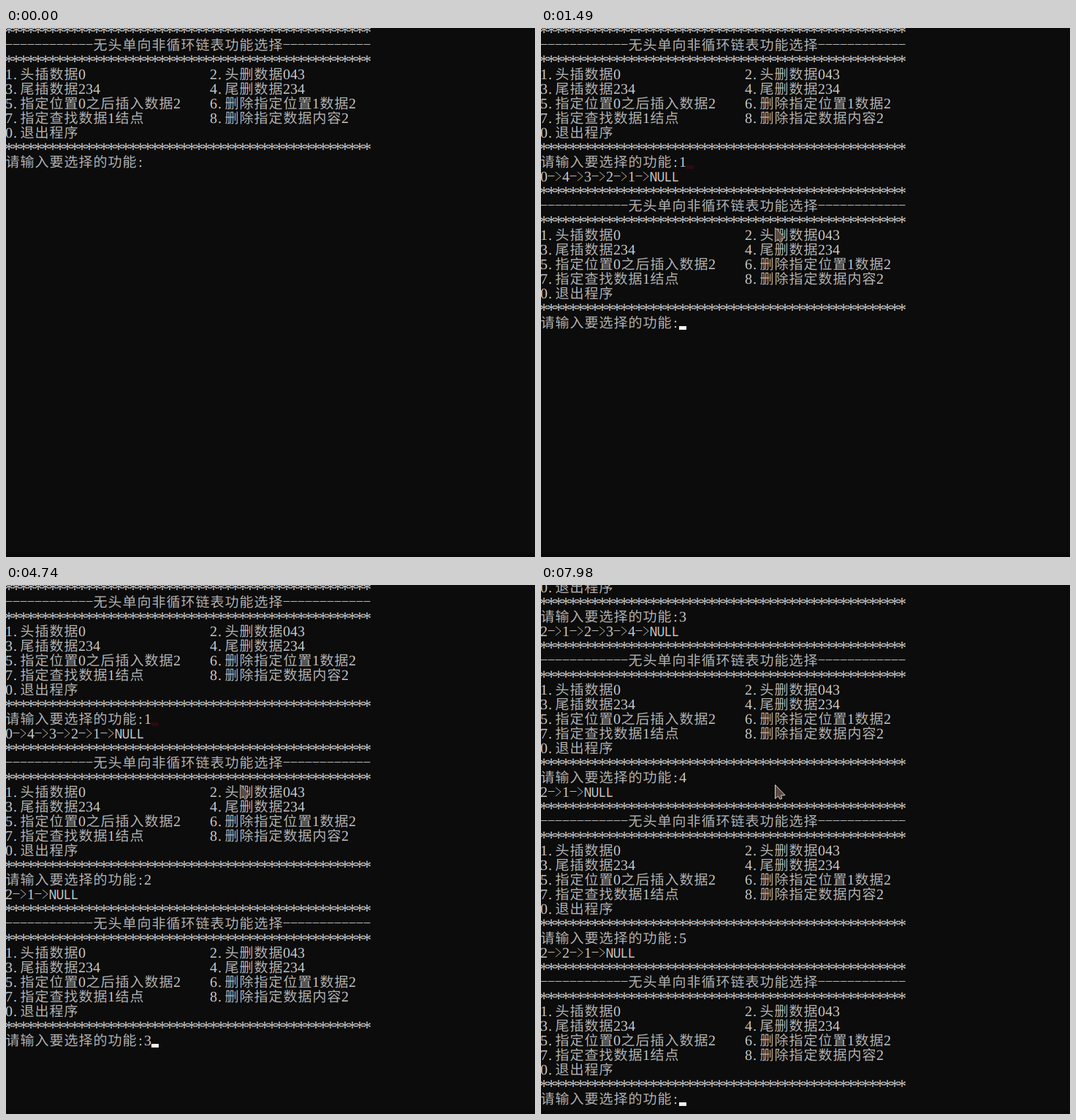
These frames come from a looping animation (724 by 724 pixels, 8000 ms). An HTML page:

```html
<!DOCTYPE html>
<html lang="zh">
<head>
<meta charset="utf-8">
<title>Linked list menu</title>
<style>
  html, body { margin: 0; width: 100%; height: 100%; overflow: hidden; background: #0c0c0c; }
  svg { display: block; width: 100vw; height: 100vh; overflow: hidden; }
  text { fill: currentColor; text-rendering: geometricPrecision; }
  use { mix-blend-mode: screen; }
  .han { font: 300 19px "Noto Sans CJK SC", "Noto Sans CJK", sans-serif; fill-opacity: .88; }
  .num { font: 20px "Liberation Serif", serif; text-anchor: middle; }
  .cap { font: 300 18px "Noto Sans Mono", monospace; text-anchor: middle; }
  .star { font: 25px "Liberation Serif", serif; text-anchor: middle; }
  .dash { fill: none; stroke: currentColor; stroke-width: 1; stroke-opacity: .9; }
</style>
</head>
<body>
<svg id="stage" viewBox="0 0 724 724">
  <defs><g id="term"></g></defs>
  <rect width="724" height="724" fill="#0c0c0c"/>
  <rect y="719" width="724" height="5" fill="#080808"/>
  <!-- one layer per colour channel gives the subpixel fringes of console text -->
  <use href="#term" x=".33" color="#c80000"/>
  <use href="#term" color="#00c800"/>
  <use href="#term" x="-.33" color="#0000c8"/>
  <rect id="stain" x="199" y="188" width="10" height="5" fill="#2c0a10"/>
  <rect id="caret" width="10" height="5" fill="#f2f2f2"/>
  <path id="mouse" d="M.5 .5V19.5L4.6 16L7 20.2L9.8 19.4L8.4 15.2L14 14.6Z" fill="#5a4a44" stroke-linejoin="round"/>
</svg>
<script>
const NS = 'http://www.w3.org/2000/svg';
const LOOP = 8000, CELL = 10, ROW = 20, LEFT = -1, TOP = -7, BLOCK = 11, LAST_ROW = 35;
const STARS = '*'.repeat(50), LINE = '-'.repeat(12);
const MENU = [
  [STARS],
  [LINE + '无头单向非循环链表功能选择' + LINE],
  [STARS],
  ['1.头插数据0', '2.头删数据043'],
  ['3.尾插数据234', '4.尾删数据234'],
  ['5.指定位置0之后插入数据2', '6.删除指定位置1数据2'],
  ['7.指定查找数据1结点', '8.删除指定数据内容2'],
  ['0.退出程序'],
  [STARS],
  ['请输入要选择的功能:']
];
const PROMPT_ROW = 9, PROMPT_COL = 19, SECOND_COL = 28;
const RESULTS = [
  '0->4->3->2->1->NULL', '2->1->NULL', '2->1->2->3->4->NULL',
  '2->1->NULL', '2->2->1->NULL'
];
const TYPED = [1030, 2880, 4140, 6060, 7320];
const ENTERED = [1490, 3350, 4940, 6590, 7980];
const CARET_ON = [
  [1030, 2090], [2620, 3150], [3350, 4210], [4740, 5730],
  [6060, 6260], [6590, 7320], [7850, LOOP]
];

const el = id => document.getElementById(id);

// Skips unchanged values so the layers are not rebuilt every frame.
function set(node, key, value) {
  if (node.getAttribute(key) !== String(value)) node.setAttribute(key, value);
}
const show = (node, on) => set(node, 'visibility', on ? 'visible' : 'hidden');

function add(parent, tag, attrs = {}, text = '') {
  const node = document.createElementNS(NS, tag);
  for (const key in attrs) node.setAttribute(key, attrs[key]);
  node.textContent = text;
  parent.appendChild(node);
  return node;
}

const kindOf = ch =>
  ch === '*' ? 'star' :
  ch > '\u2e80' ? 'han' :
  /[A-Z]/.test(ch) ? 'cap' : 'num';

// Places each character on the console grid, wide ones over two cells.
function write(parent, str, row, col = 0) {
  const top = TOP + row * ROW, runs = {};
  let strokes = '';
  for (const ch of str) {
    const x = LEFT + col * CELL, kind = kindOf(ch);
    col += kind === 'han' ? 2 : 1;
    if (ch === '-') { strokes += `M${x + .5} ${top + 9.5}h9`; continue; }
    if (ch === '>') { strokes += `M${x + 1} ${top + 4}l7 6l-7 6`; continue; }
    const run = runs[kind] = runs[kind] || { text: '', xs: [] };
    run.text += ch;
    run.xs.push(x + (kind === 'han' ? .5 : ch === '.' ? 3.5 : 5));
  }
  for (const kind in runs) {
    const y = top + (kind === 'star' ? 21 : 17);
    add(parent, 'text', { class: kind, x: runs[kind].xs.join(' '), y }, runs[kind].text);
  }
  if (strokes) add(parent, 'path', { class: 'dash', d: strokes });
}

const term = el('term'), menus = [], digits = [], results = [];
for (let b = 0; b <= RESULTS.length; b++) {
  const first = b * BLOCK;
  const menu = add(term, 'g');
  MENU.forEach((parts, i) =>
    parts.forEach((part, j) => write(menu, part, first + i, j * SECOND_COL)));
  menus.push(menu);
  if (b === RESULTS.length) break;
  digits.push(add(term, 'g'));
  write(digits[b], String(b + 1), first + PROMPT_ROW, PROMPT_COL);
  results.push(add(term, 'g'));
  write(results[b], RESULTS[b], first + PROMPT_ROW + 1);
}

function mousePos(t) {
  const step = Math.floor((t - 70) / 70);
  if (step >= 8) return [320, 273];
  const ease = 1 - (1 - step / 7) ** 2;
  return [674 - 361 * ease, 706 - 447 * ease];
}

function draw(t) {
  const done = ENTERED.filter(at => t >= at).length;
  const typed = TYPED.filter(at => t >= at).length;
  menus.forEach((g, i) => show(g, i <= done));
  results.forEach((g, i) => show(g, i < done));
  digits.forEach((g, i) => show(g, i < typed));

  const promptRow = done * BLOCK + PROMPT_ROW;
  const scroll = Math.max(0, promptRow - LAST_ROW);
  set(term, 'transform', `translate(0 ${-scroll * ROW})`);

  const caret = el('caret');
  set(caret, 'x', LEFT + (PROMPT_COL + typed - done) * CELL);
  set(caret, 'y', TOP + (promptRow - scroll) * ROW + 15);
  show(caret, CARET_ON.some(([a, b]) => t >= a && t < b));

  const faded = done === 1 || done === 2;
  show(el('stain'), faded);
  const mouse = el('mouse');
  show(mouse, t >= 70);
  set(mouse, 'stroke', faded ? '#aa9c8e' : '#dccbbf');
  set(mouse, 'transform', `translate(${mousePos(Math.max(t, 70)).join(' ')})`);
}

const start = performance.now();
function tick() {
  draw((performance.now() - start) % LOOP);
  requestAnimationFrame(tick);
}
draw(0);
requestAnimationFrame(tick);
</script>
</body>
</html>
```
